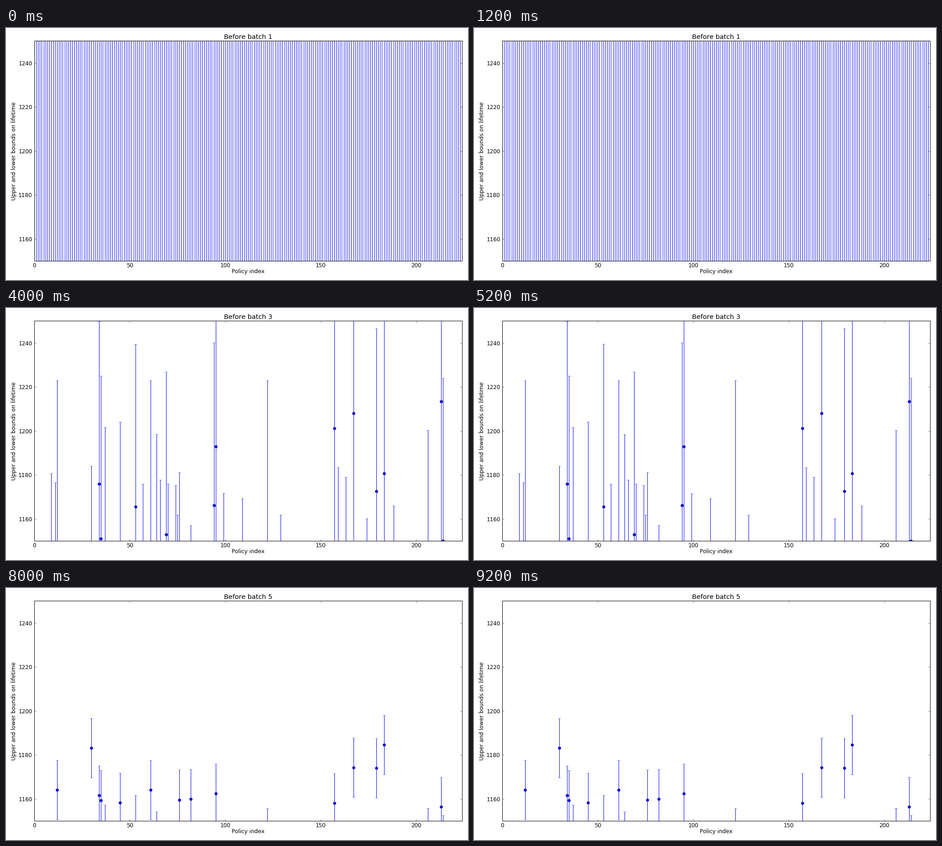
Write a matplotlib script that moves like this. It is 1013 px wide and 553 px high and loops after 10000 ms.

```python
import matplotlib.pyplot as plt
import numpy as np
from matplotlib.animation import FuncAnimation

W, H, DPI = 1013, 553, 72
LEFT, RIGHT, TOP, BOTTOM = 61.6, 1000.4, 28.5, 510.9
BLUE = "#0000ff"
POLICIES = 224

plt.rcParams.update({
    "font.family": "DejaVu Sans", "font.size": 12, "text.kerning_factor": 6,
    "axes.linewidth": 1.0, "axes.axisbelow": False,
    "xtick.top": True, "ytick.right": True,
})
for axis in ("xtick", "ytick"):
    plt.rcParams.update({f"{axis}.direction": "in", f"{axis}.major.size": 4,
                         f"{axis}.major.width": 0.5, f"{axis}.major.pad": 4})

# Half the distance between the bounds shrinks with every batch
HALF = [1000, 170, 74, 31, 13.5]

# Estimated lifetimes of the best policies before batches 3, 4 and 5
LEADERS = {
    12: (1149, 1172, 1164.1), 30: (1110, 1152.3, 1183.2),
    34: (1175.8, 1173.9, 1161.6), 35: (1151.1, 1176.6, 1159.4),
    45: (1130, 1149, 1158.3), 53: (1165.5, 1174.2, 1148),
    61: (1149, 1167.7, 1164.1), 69: (1152.9, 1133, 1120),
    76: (1107, 1134, 1159.6), 82: (1083, 1125, 1159.9),
    94: (1166.1, 1124, 1110), 95: (1192.8, 1197.9, 1162.4),
    122: (1149, 1162.4, 1142), 157: (1201.2, 1193.3, 1158),
    167: (1208, 1201.9, 1174.3), 179: (1172.5, 1199, 1174.1),
    183: (1180.7, 1201.3, 1184.6), 213: (1213.4, 1190.4, 1156.4),
    214: (1150, 1142, 1139),
}
RUNNERS_UP = [9, 11, 37, 57, 64, 66, 70, 74, 75, 99, 109, 129, 159, 163, 174,
              188, 206]


def make_estimates():
    """One row per batch; policies that fall behind drop out of view."""
    rng = np.random.default_rng(5)
    index = np.arange(POLICIES)
    est = np.full((len(HALF), POLICIES), 500.0)
    est[0] = 1140
    # The lowest policy indices start out a little worse
    spread = rng.uniform(-130, 130, POLICIES)
    est[1] = 1145 + 45 * np.minimum(1, index / 50) + spread - HALF[1]
    est[1, RUNNERS_UP + list(LEADERS)] = 1140
    est[1, [12, 34]] = 1174.3, 1161.6

    start = rng.uniform(1085, 1130, len(RUNNERS_UP))
    for step in range(3):
        est[2 + step, RUNNERS_UP] = start + 8 * step
    for policy, values in LEADERS.items():
        est[2:, policy] = values
    return est


estimates = make_estimates()

fig = plt.figure(figsize=((W + 1e-6) / DPI, (H + 1e-6) / DPI), dpi=DPI,
                 facecolor="white")
ax = fig.add_axes([LEFT / W, 1 - BOTTOM / H,
                   (RIGHT - LEFT) / W, (BOTTOM - TOP) / H])
ax.set(xlim=(0, POLICIES), ylim=(1150, 1250),
       xticks=range(0, 201, 50), yticks=range(1160, 1241, 20))


def label(x, y, text, rotation=0):
    fig.text(x / W, 1 - y / H, text, rotation=rotation,
             rotation_mode="anchor", ha="center", va="baseline")


label((LEFT + RIGHT) / 2, 537.5, "Policy index")
label(21, (TOP + BOTTOM) / 2, "Upper and lower bounds on lifetime", 90)
title = ax.set_title("", fontsize=14.4, pad=5)

bars = ax.vlines([], [], [], colors=BLUE, linewidth=1)
caps, = ax.plot([], [], "_", color=BLUE, ms=6, mew=0.5)
dots, = ax.plot([], [], "o", color=BLUE, ms=6, mec="black", mew=0.5)


def draw(n):
    x, mid = np.arange(POLICIES), estimates[n]
    low, top = mid - HALF[n], mid + HALF[n]
    bars.set_segments([[(i, a), (i, b)] for i, a, b in zip(x, low, top)])
    caps.set_data(np.tile(x, 2), np.concatenate([low, top]))
    dots.set_data(x, mid)
    title.set_text(f"Before batch {n + 1}")
    return bars, caps, dots, title


anim = FuncAnimation(fig, draw, frames=len(HALF), interval=2000,
                     repeat=True, repeat_delay=0, blit=False)
plt.show()
```
